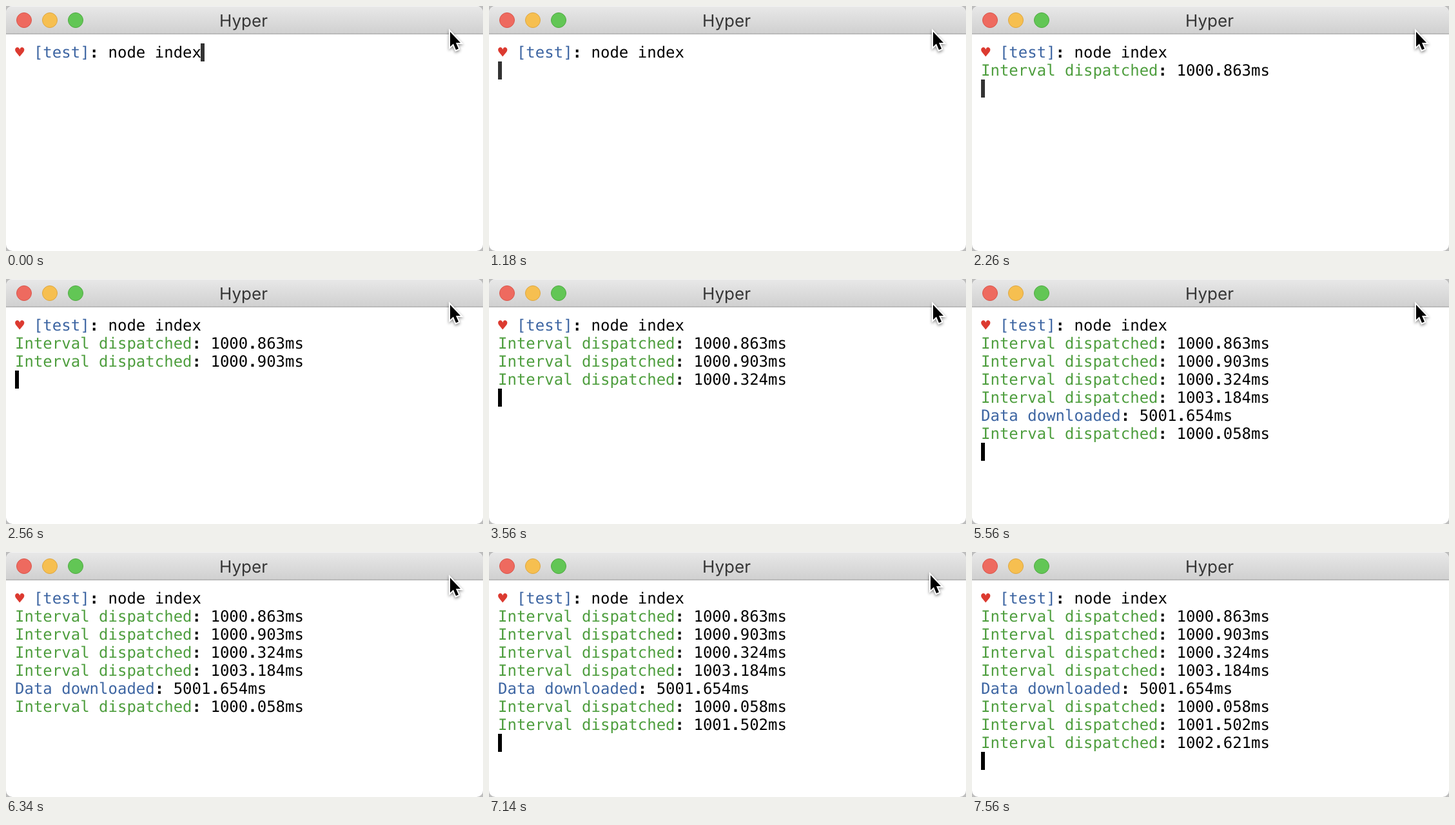
Animation, 740 px wide and 380 px high, one loop 8980 ms. Source, as an HTML page:

```html
<!DOCTYPE html>
<html lang="en">
<head>
<meta charset="utf-8">
<title>Terminal</title>
<style>
  html, body { margin: 0; width: 100%; height: 100%; overflow: hidden; background: #bdbdbd; }
  #stage { position: absolute; left: 0; top: 0; width: 740px; height: 380px; overflow: hidden;
    border-radius: 10px; background: #fff; }
  svg { position: absolute; left: 0; top: 0; }
  #screen { position: absolute; left: 14px; top: 58px; color: #000; white-space: pre;
    font: 24px/28px "DejaVu Sans Mono", monospace; text-rendering: geometricPrecision; }
  #screen div { height: 28px; }
  .red { color: #dc3a30; }
  .blue { color: #3d65a2; }
  .green { color: #4e9e3e; }
  #caret { position: absolute; width: 6px; height: 28px; background: #000; }
  #pointer { filter: drop-shadow(0 2px 2px rgba(0, 0, 0, .45)); }
</style>
</head>
<body>
<div id="stage">
  <svg width="740" height="380">
    <defs>
      <linearGradient id="bar" x2="0" y2="1">
        <stop stop-color="#e8e8e8"/>
        <stop offset="1" stop-color="#d0d0d0"/>
      </linearGradient>
    </defs>
    <rect width="740" height="43" fill="url(#bar)"/>
    <rect width="740" height="1" fill="#f3f3f3"/>
    <rect y="42.5" width="740" height="1.5" fill="#b2b2b2"/>
    <circle cx="28" cy="22" r="11.5" fill="#ee6a5f" stroke="#d8564c"/>
    <circle cx="68" cy="22" r="11.5" fill="#f6bf50" stroke="#dca642"/>
    <circle cx="108" cy="22" r="11.5" fill="#62c655" stroke="#51a944"/>
    <text x="368.5" y="32" text-anchor="middle" font-size="26" fill="#363636"
      font-family="Inter, sans-serif" text-rendering="geometricPrecision">Hyper</text>
  </svg>
  <div id="screen"></div>
  <div id="caret"></div>
  <svg width="740" height="380">
    <g id="pointer">
      <path d="M689 40V63L694 58.5L698 68L702 66.3L698 57H705Z" fill="#000"
        stroke="#fff" stroke-width="4" paint-order="stroke"/>
    </g>
  </svg>
</div>
<script>
const LOOP = 8980, STEP = 20, ROW = 28;
const $ = id => document.getElementById(id);
const screen_ = $("screen"), caret = $("caret"), pointer = $("pointer");

const lines = [];
function addLine(time, html) {
  const el = document.createElement("div");
  el.innerHTML = html;
  screen_.append(el);
  lines.push({ time, el });
}
const addTiming = (time, color, label, value) =>
  addLine(time, `<span class="${color}">${label}</span><b>:</b> ${value.replace(".", "<b>.</b>")}ms`);
const addInterval = (time, value) => addTiming(time, "green", "Interval dispatched", value);

addLine(0, '<span class="red">♥</span> <span class="blue">[test]</span><b>:</b> node index');
addInterval(1560, "1000.863");
addInterval(2560, "1000.903");
addInterval(3560, "1000.324");
addInterval(4560, "1003.184");
addTiming(5560, "blue", "Data downloaded", "5001.654");
addInterval(5560, "1000.058");
addInterval(6560, "1001.502");
addInterval(7560, "1002.621");

// Each blink: caret shown, fade start, fully hidden.
const blinks = [[0, 0, 80], [480, 1180, 1240]];
for (let t = 1560; t < 7000; t += 1000) blinks.push([t, t + 700, t + 780]);
blinks.push([7560, LOOP, LOOP + 80]);

function caretOpacity(t) {
  const [, start, end] = blinks.findLast(b => b[0] <= t);
  return t < start ? 1 : Math.max(0, 0.8 * (end - t) / (end - start));
}

function draw() {
  const t = Math.floor(performance.now() % LOOP / STEP) * STEP;

  let shown = 0;
  for (const { time, el } of lines) {
    const on = t >= time;
    el.style.visibility = on ? "visible" : "hidden";
    shown += on;
  }

  const typing = t < 480;
  caret.style.left = (typing ? 302 : 14) + "px";
  caret.style.top = 58 + ROW * (typing ? 0 : shown) + "px";
  caret.style.opacity = caretOpacity(t);

  // The pointer speeds up toward the top edge and leaves.
  const k = Math.max(0, (t - 7120) / STEP);
  const shift = 2 * k + 2 * k * k;
  pointer.setAttribute("transform", `translate(${-shift} ${-shift})`);
  pointer.style.visibility = t < 7340 ? "visible" : "hidden";

  requestAnimationFrame(draw);
}
draw();
</script>
</body>
</html>
```
